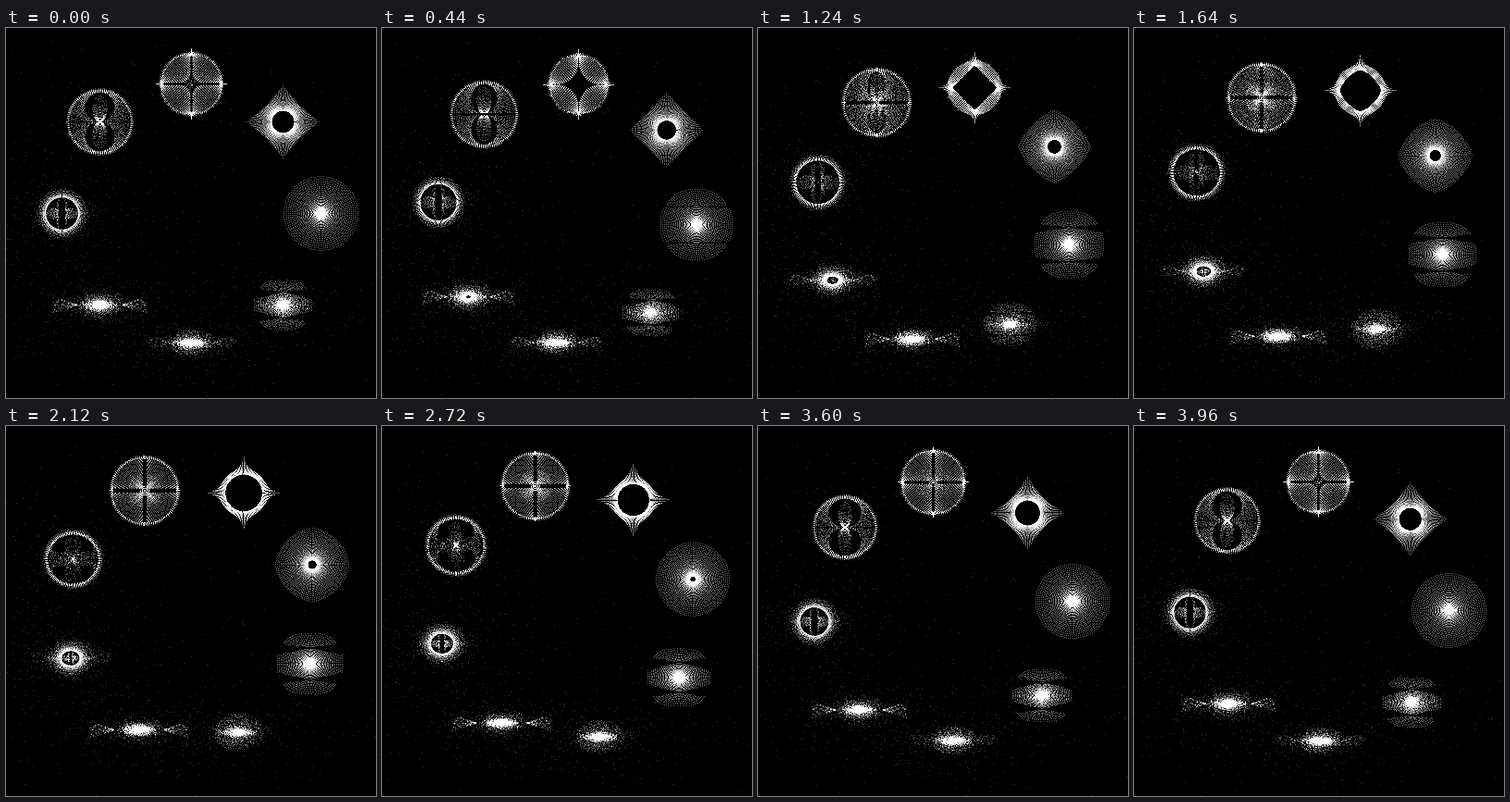
Animation, 400 px wide and 400 px high, one loop 4000 ms. Source, as an HTML page with a canvas:

```html
<!DOCTYPE html>
<html lang="en">
<head>
<meta charset="utf-8">
<title>Orbiting dot clusters</title>
<style>
html, body { margin: 0; width: 100%; height: 100%; overflow: hidden; background: #000; }
canvas { display: block; width: 100vw; height: 100vh; image-rendering: pixelated; }
</style>
</head>
<body>
<canvas id="stage" width="400" height="400"></canvas>
<script>
const SIZE = 400, LOOP = 4000, STEP = 40, COPIES = 8, ORBIT = 140, RADIUS = 41;
const RAYS = 110, DOTS = 28;
const { abs, cos, exp, hypot, log, max, min, sin, sqrt, tan, PI } = Math;
const ctx = document.getElementById('stage').getContext('2d');
const image = ctx.createImageData(SIZE, SIZE);
const light = new Uint16Array(SIZE * SIZE);

// Fixed random values, so every cluster shares the same grain.
const noise = Float32Array.from({ length: 8192 }, (_, i) => {
  const v = sin(i * 127.1 + 11.7) * 43758.5453;
  return v - Math.floor(v);
});
const rnd = n => noise[n & 8191];
const bell = n => (rnd(n) + rnd(n + 1777) + rnd(n + 3331) - 1.5) * 1.6;

const part = (d, a, b) => min(1, max(0, (d - a) / (b - a)));
const ramp = (d, a, b) => (1 - cos(PI * part(d, a, b))) / 2;
const bump = (d, a, b) => sin(PI * part(d, a, b));
const power = (v, k) => v * Math.pow(abs(v), k);

let ox = 0, oy = 0;
function plot(x, y, v = 100) {
  const px = Math.round(ox + x), py = Math.round(oy + y);
  if (px >= 0 && py >= 0 && px < SIZE && py < SIZE) light[py * SIZE + px] += v;
}

// Visits a polar grid, thinned out to the share "keep".
function rays(count, dots, keep, fn) {
  if (keep <= 0.001) return;
  for (let i = 0; i < count; i++) {
    const a = i / count * 2 * PI, c = cos(a), s = sin(a);
    for (let j = 0; j < dots; j++) {
      const n = i * dots + j;
      if (rnd(n * 3 + 5) < keep) fn(c, s, (j + 0.5) / dots, n);
    }
  }
}

// Calls fn with the numbers of the grains kept.
function grains(count, keep, fn) {
  for (let i = 0; i < count; i++) if (rnd(i * 13 + 1) < keep) fn(i);
}

// Flattening disc, cut into bands by notches from both sides.
function disc(d) {
  const W = RADIUS - 0.2 * d, H = RADIUS - 0.3 * d;
  const gap = 6 * bump(d, 0, 66), box = bump(d, 0, 72);
  const keep = (1 - 0.8 * ramp(d, 25, 78)) * (1 - ramp(d, 115, 140));
  rays(RAYS, DOTS, keep, (c, s, u) => {
    const r = u ** 1.6, e = r * c, y = H * r * s, q = abs(y);
    const mid = H * 0.5 - 2 * box * e * e;
    if (abs(q - mid) < gap * (0.1 + 1.1 * abs(e))) return;
    const wide = 1 / sqrt(1.01 - (y / H) ** 2);
    plot(W * e * (1 + (wide - 1) * box * (q < mid ? 1 : 0.35)), y);
  });
}

// Bright rim around the hole; the glow thins out outwards.
function rim(d, h) {
  const spread = 1 + 4 * bump(d, 40, 215), flat = 1 - ramp(d, 95, 180);
  const keep = ramp(d, 45, 75) * (1 - 0.4 * ramp(d, 185, 225)) * (1 - ramp(d, 255, 292));
  rays(RAYS, 12, keep, (c, s, u, n) => {
    const fall = -log(1.01 - (u + rnd(n) * 0.08) * 0.92);
    const r = h + spread * (fall - 0.4);
    plot(r * c * (1 + 1.2 * flat), r * s * (1 - 0.3 * flat), 95);
  });
}

function spots(d) {
  const at = 8 + abs(d - 105) * 0.2;
  grains(80, 0.7 * bump(d, 32, 185), i => {
    const x = at + bell(i * 5) * 4, y = bell(i * 5 + 900) * 2.2;
    plot(x, y);
    plot(-x, y);
  });
}

function wings(d) {
  const tip = 28 - abs(d - 118) * 0.2;
  grains(170, bump(d, 78, 165), i => {
    const u = rnd(i * 3) ** 1.3, x = tip + 26 * u;
    const y = (i % 11 - 5) / 5 * (0.5 + 8 * u);
    plot(x, y, 75);
    plot(-x, y, 75);
  });
}

// Wide scatter, with a few dots flung right across the stage.
function dust(d, h) {
  const round = ramp(d, 100, 215), sy = 9 + 11 * round;
  const keep = 0.03 + ramp(d, 25, 85) * (1 - ramp(d, 180, 245));
  grains(900, keep, i => {
    const far = tan(rnd(i * 5 + 2) * 1.53), t = rnd(i * 7 + 4) * 2 * PI;
    const x = 23 * far * cos(t), y = sy * far * sin(t);
    if (hypot(x, y) > h) plot(x, y, far > 1.5 ? 45 : 60);
  });
}

// Faint petals inside the ring, parted by an upright dark lens.
function petals(d, h) {
  const slit = 4 * bump(d, 150, 215);
  rays(80, 12, 0.7 * bump(d, 148, 218), (c, s, u) => {
    const r = h * 0.92 * u * (0.35 + 0.65 * abs(c * c - s * s));
    const x = r * c, y = r * s;
    if (abs(x) > slit * sqrt(max(0, 1 - (y / h) ** 2))) plot(x, y, 90);
  });
}

// Radius of two stacked ellipses that touch in the middle.
const eight = (c, s, w, h) =>
  2 * abs(s) / h / (c * c / (w * w) + s * s / (h * h));

function lobes(d, h) {
  const half = h / 2 - 1, split = 2 * ramp(d, 220, 236);
  const outer = 3.4 * sqrt(max(1, 247 - d)), inner = 3 + 5 * bump(d, 205, 250);
  const keep = 0.7 * ramp(d, 192, 232) * (1 - ramp(d, 238, 247));
  const dot = (r, c, s) => {
    if (abs(r * s) >= split) plot(r * c, r * s);
  };
  rays(RAYS, 18, keep, (c, s, u) => {
    const from = min(eight(c, s, outer, half), h - 1);
    dot(from + (h - from) * u, c, s);
  });
  rays(RAYS, 10, keep, (c, s, u) => dot(eight(c, s, inner, half * 0.92) * u, c, s));
}

const cross = d => 2.3 * bump(d, 225, 280);

function core(d) {
  const gap = cross(d);
  rays(80, 10, 0.8 * bump(d, 234, 272), (c, s, u) => {
    const r = 18 * u, x = r * c, y = r * s;
    if (r < 5 || min(abs(x), abs(y)) > gap) plot(x, y, 85);
  });
}

// Ring with four spikes around a hole that closes into the full disc.
function star(d, h) {
  const s = 360 - d, gap = cross(d);
  const hole = min(h - 1, s * (0.2 + 0.0016 * s));
  const pinch = 1.3 * (max(0, s - 64) / 14) ** 2;
  const sharp = (s / 45) ** 3.6;
  const spike = RADIUS - 0.03 * s - h;
  rays(RAYS + 2, DOTS, ramp(d, 234, 246), (ca, sa, u) => {
    const reach = h + spike * exp(-sharp * 2 * abs(ca * sa)), f = u ** 1.5;
    const mix = v => max(0, hole) * power(v, pinch) * (1 - f) + reach * v * f;
    const x = mix(ca), y = mix(sa);
    if (hypot(x, y) > h - 2 || min(abs(x), abs(y)) >= gap) plot(x, y);
  });
}

function cluster(d) {
  const h = d < 112 ? 0 : 36 * sin((d - 112) * PI / 266) ** 2;
  if (d < 140) disc(d);
  if (d < 292) rim(d, h);
  spots(d);
  wings(d);
  dust(d, h);
  petals(d, h);
  lobes(d, h);
  core(d);
  if (d > 234) star(d, h);
}

function draw(time) {
  light.fill(0);
  for (let i = 0; i < COPIES; i++) {
    const d = (i + time / LOOP) * 360 / COPIES, a = d * PI / 180;
    ox = SIZE / 2 + ORBIT * cos(a);
    oy = SIZE / 2 + ORBIT * sin(a);
    cluster(d);
  }
  const px = image.data;
  light.forEach((v, i) => {
    px.fill(min(255, v), i * 4, i * 4 + 3);
    px[i * 4 + 3] = 255;
  });
  ctx.putImageData(image, 0, 0);
}

let shown = -1;
function tick() {
  const time = Math.floor(performance.now() % LOOP / STEP) * STEP;
  if (time !== shown) draw(shown = time);
  requestAnimationFrame(tick);
}
tick();
</script>
</body>
</html>
```
